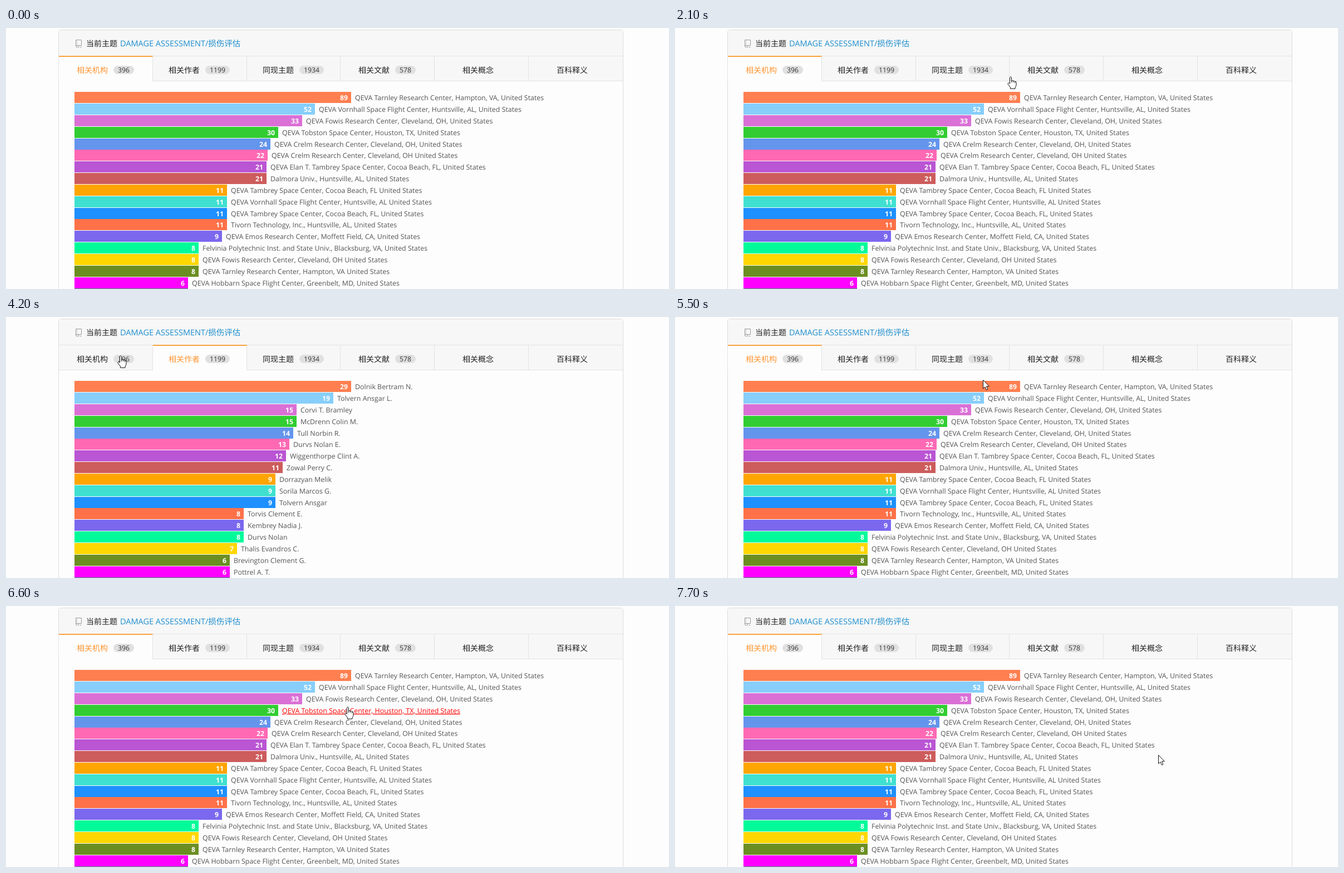
These frames come from a looping animation (1191 by 470 pixels, 8 s). An HTML page:

```html
<!DOCTYPE html>
<html lang="zh">
<head>
<meta charset="utf-8">
<style>
  html, body { margin: 0; width: 100%; height: 100%; overflow: hidden; background: #fdfdfd; }
  svg { display: block; width: 1191px; height: 470px; }
  text {
    font-family: "Open Sans", "Noto Sans CJK SC", "Noto Sans CJK", sans-serif;
    font-size: 14px; fill: #222; text-rendering: geometricPrecision;
  }
  .topic { font-size: 14.5px; fill: #1d8dcd; }
  .label { font-size: 12.4px; fill: #555; }
  .label.hover { fill: #f00; text-decoration: underline; }
  .value { font-size: 12.3px; font-weight: 700; fill: #fff; text-anchor: end; }
  .count { font-size: 12.3px; fill: #333; text-anchor: middle; }
  .face { fill: #f7f7f7; }
  .line { fill: #e3e3e3; }
  .top { fill: none; }
  .active .name { fill: #ff9530; }
  .active .face { fill: #fdfdfd; }
  .active .top { fill: #f9a13c; }
  .active .bottom { fill: none; }
</style>
</head>
<body>
<svg id="stage" viewBox="0 0 1191 470">
  <rect x="94.5" y="3.5" width="1014" height="500" rx="4" fill="#fdfdfd" stroke="#dedcdd"/>
  <path d="M95 50V7q0-3 3-3H1105q3 0 3 3V50Z" fill="#f7f7f7"/>
  <rect class="line" x="95" y="50" width="1013" height="1"/>
  <g fill="none" stroke="#999">
    <path d="M125.5 33V21.5H135.5V31.5H126.5q-2 1.5 0 3H129M133 34.5H135.5M130.5 32V35.5"/>
    <path d="M127.5 22V31" stroke="#ccc"/>
  </g>
  <text x="144" y="33">当前主题</text>
  <text x="205" y="33" class="topic">DAMAGE ASSESSMENT/损伤评估</text>
</svg>
<script>
const stage = document.getElementById('stage');

function add(parent, tag, attrs, text = '') {
  const el = document.createElementNS('http://www.w3.org/2000/svg', tag);
  for (const key in attrs) el.setAttribute(key, attrs[key]);
  el.textContent = text;
  return parent.appendChild(el);
}

// Linear interpolation through points [position, ...values]
function along(points, pos) {
  const i = Math.max(1, points.findIndex(p => p[0] >= pos));
  const a = points[i - 1], b = points[i], k = (pos - a[0]) / (b[0] - a[0]);
  return a.slice(1).map((v, n) => Math.round(v + (b[n + 1] - v) * k));
}

const tabs = '相关机构 396,相关作者 1199,同现主题 1934,相关文献 578,相关概念,百科释义'.split(',').map((tab, i) => {
  const [name, count] = tab.split(' ');
  const badge = count ? 16 + 7 * count.length : 0;
  const left = Math.round(95.4 + 168.65 * i), width = 169;
  const x = Math.floor(left + (width - 66 - badge) / 2 - 1);
  const g = add(stage, 'g', {});
  add(g, 'rect', { class: 'face', x: left, y: 51, width, height: 45 });
  add(g, 'rect', { class: 'line bottom', x: left, y: 95, width, height: 1 });
  add(g, 'rect', { class: 'line', x: left - 1, y: 51, width: 1, height: 45 });
  add(g, 'rect', { class: 'top', x: left, y: 50, width, height: 2 });
  add(g, 'text', { class: 'name', x, y: 81 }, name);
  if (count) {
    add(g, 'rect', { x: x + 66, y: 68, width: badge, height: 15, rx: 7.5, fill: '#e0e0e0' });
    add(g, 'text', { class: 'count', x: x + 66 + badge / 2, y: 80 }, count);
  }
  return g;
});

const orgs = `89 QEVA Tarnley Research Center, Hampton, VA, United States
52 QEVA Vornhall Space Flight Center, Huntsville, AL, United States
33 QEVA Fowis Research Center, Cleveland, OH, United States
30 QEVA Tobston Space Center, Houston, TX, United States
24 QEVA Crelm Research Center, Cleveland, OH, United States
22 QEVA Crelm Research Center, Cleveland, OH United States
21 QEVA Elan T. Tambrey Space Center, Cocoa Beach, FL, United States
21 Dalmora Univ., Huntsville, AL, United States
11 QEVA Tambrey Space Center, Cocoa Beach, FL United States
11 QEVA Vornhall Space Flight Center, Huntsville, AL United States
11 QEVA Tambrey Space Center, Cocoa Beach, FL, United States
11 Tivorn Technology, Inc., Huntsville, AL, United States
9 QEVA Emos Research Center, Moffett Field, CA, United States
8 Felvinia Polytechnic Inst. and State Univ., Blacksburg, VA, United States
8 QEVA Fowis Research Center, Cleveland, OH United States
8 QEVA Tarnley Research Center, Hampton, VA United States
6 QEVA Hobbarn Space Flight Center, Greenbelt, MD, United States
6 `;
const authors = `29 Dolnik Bertram N.
19 Tolvern Ansgar L.
15 Corvi T. Bramley
15 McDrenn Colin M.
14 Tull Norbin R.
13 Durvs Nolan E.
12 Wiggenthorpe Clint A.
11 Zowal Perry C.
9 Dorrazyan Melik
9 Sorila Marcos G.
9 Tolvern Ansgar
8 Torvis Clement E.
8 Kembrey Nadia J.
8 Durvs Nolan
7 Thalis Evandros C.
6 Brevington Clement G.
6 Pottrel A. T.
6 `;

// Bar length by value: the scale is linear within tiers
const orgScale = [[6, 203], [8, 222], [9, 264], [11, 273], [21, 344], [30, 365], [33, 408], [52, 431], [89, 496]];
const authorScale = [[6, 278], [8, 303], [9, 360], [15, 398], [19, 464], [29, 496]];

const colors = ('#ff7f50 #87cefa #da70d6 #32cd32 #6495ed #ff69b4 #ba55d3 #cd5c5c #ffa500 ' +
  '#40e0d0 #1e90ff #ff7148 #7b68ee #00fa9a #ffd700 #6b8e23 #ff00ff #3cb371').split(' ');

function makeChart(list, scale) {
  const group = add(stage, 'g', {});
  const labels = list.split('\n').map((row, i) => {
    const [, value, name] = row.match(/(\d+) (.*)/);
    const [width] = along(scale, +value);
    const y = Math.round(115.3 + 20.83 * i), x = 123 + width + 8;
    add(group, 'rect', { x: 123, y, width: width + 1, height: 20, fill: colors[i] });
    add(group, 'text', { class: 'value', x: x - 13, y: y + 15 }, value);
    return { x, y, el: add(group, 'text', { class: 'label', x, y: y + 15 }, name) };
  });
  return { group, labels };
}
const charts = [makeChart(orgs, orgScale), makeChart(authors, authorScale)];

const cursor = add(stage, 'path', { fill: '#fff', stroke: '#111', 'stroke-linejoin': 'round' });
const ARROW = 'M.5 .5V16L4 12.7 6.3 18.3 8.8 17.2 6.5 11.8H11.3Z';
const HAND = 'M-1.5 13V2Q0 -.8 1.5 2V11V8Q3 6.6 4.5 8.4V11V8.4Q6 7 7.5 9.4V12V9.4' +
  'Q10 8.4 10 11V15Q10 18 8 20V22.3H-.5V20Q-3 17 -5.3 13.5Q-4.5 10.5 -1.5 13Z';

// Pointer tip: time, x, y
const track = [
  [300, 973, 29], [900, 390, 82], [1100, 329, 71], [1700, 330, 71], [2100, 603, 87],
  [3300, 603, 87], [4000, 206, 69], [4600, 206, 69], [5000, 553, 113], [5800, 553, 113],
  [6000, 548, 275], [6300, 536, 182], [6700, 640, 180], [6900, 586, 395], [7000, 581, 327],
  [7600, 856, 268], [7700, 868, 268], [8000, 868, 268]
];

function labelAt(chart, [px, py]) {
  return chart.labels.find(({ el, x, y }) =>
    py >= y && py < y + 21 && px >= x && px <= x + el.getComputedTextLength());
}

function draw() {
  const t = Math.floor(performance.now() % 8000 / 100) * 100;
  const active = t >= 2800 && t < 5500 ? 1 : 0;
  tabs.forEach((tab, i) => tab.classList.toggle('active', i === active));
  charts.forEach(({ group }, i) =>
    group.setAttribute('visibility', i === active ? 'visible' : 'hidden'));

  // The link highlight trails the pointer by one step
  const chart = charts[active];
  const hovered = t > 300 && labelAt(chart, along(track, t - 100));
  chart.labels.forEach(l => l.el.classList.toggle('hover', l === hovered));

  const tip = along(track, t);
  const onTab = tip[1] > 50 && tip[1] < 96;
  cursor.setAttribute('visibility', t >= 300 ? 'visible' : 'hidden');
  cursor.setAttribute('d', onTab || labelAt(chart, tip) ? HAND : ARROW);
  cursor.setAttribute('transform', `translate(${tip})`);
  requestAnimationFrame(draw);
}
draw();
</script>
</body>
</html>
```
